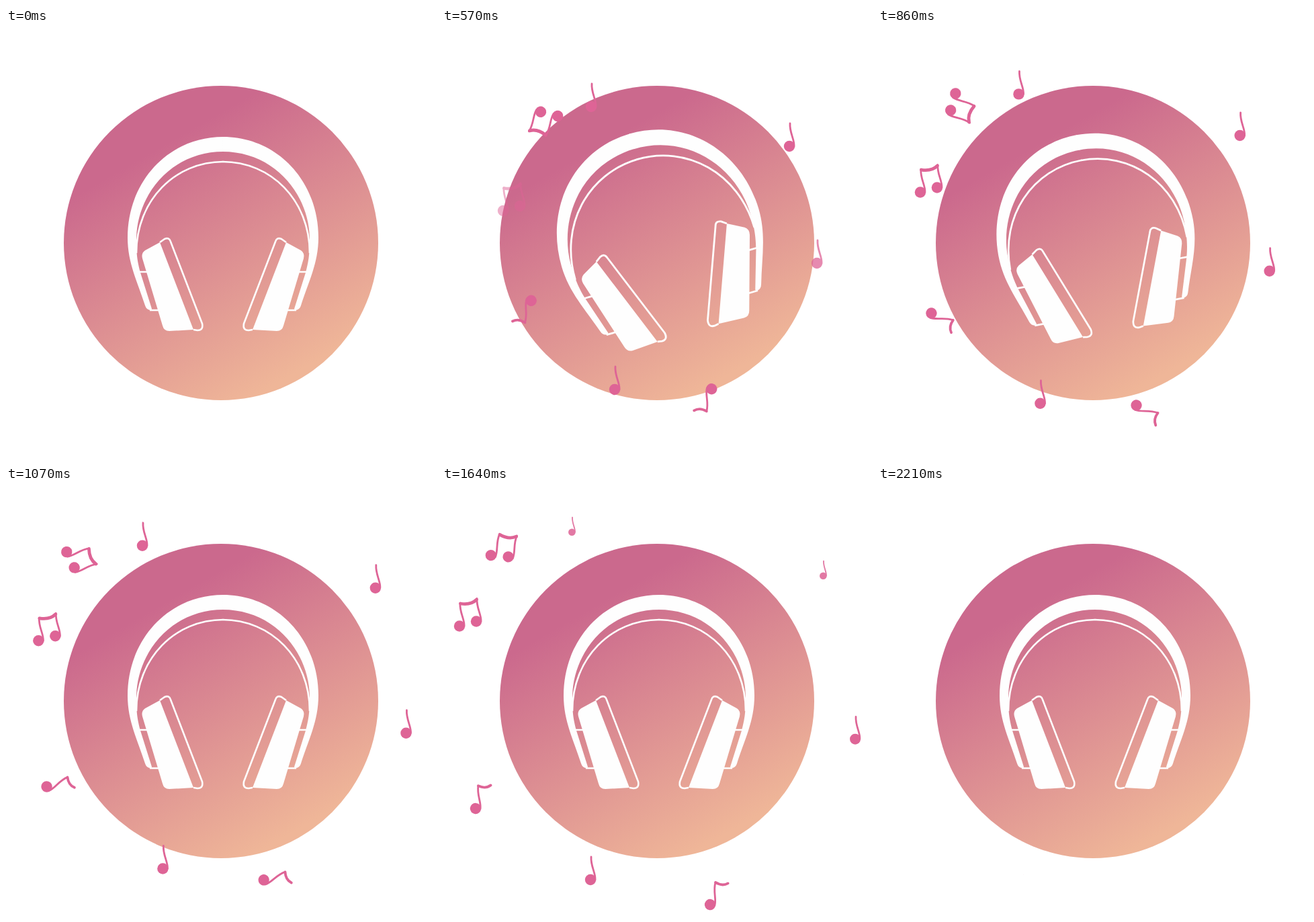
Animation, 640 px wide and 640 px high, one loop 2710 ms. Source, as an HTML page:

```html
<!DOCTYPE html>
<html lang="en">
<head>
<meta charset="utf-8">
<title>Headphones and notes</title>
<style>
html, body { margin: 0; width: 100%; height: 100%; overflow: hidden; background: #fff; }
svg { display: block; width: 100vw; height: 100vh; }
.line { fill: none; stroke: #fefefe; stroke-width: 2.6; stroke-linejoin: round; }
.stem { fill: none; stroke: #de6496; stroke-width: 2.8; stroke-linecap: round; }
.flag { stroke-width: 3.8; }
.beam { stroke-width: 4.8; }
</style>
</head>
<body>
<svg viewBox="0 0 640 640">
  <defs>
    <linearGradient id="sky" gradientUnits="userSpaceOnUse" x1="236" y1="174" x2="431" y2="513">
      <stop offset="0" stop-color="#cb698d"/>
      <stop offset="1" stop-color="#efb698"/>
    </linearGradient>
    <g id="half" fill="#fefefe">
      <path d="M323.5 162C242 162 181 228 181 312C181 350 196 378 207 413Q209 420 216 420L217 418L200 364C195 345 194 335 194 312C196 245 248 184 323.5 184Z"/>
      <path class="line" d="M323.5 199C252 199 194 256 194 335M197 363H210M214 420H228"/>
      <path d="M229 319L207 331Q201 335 203 343L233 443Q235 451 243 451L279 449Z"/>
      <path class="line" d="M229 319L236 314Q243 311 245 318L292 440Q294 450 285 450L279 449"/>
    </g>
    <g id="note">
      <circle r="8.2" fill="#de6496"/>
      <path class="stem" d="M1 -34C0 -20 8 -10 7 0"/>
    </g>
    <g id="single"><use href="#note" x="-1" y="15"/></g>
    <g id="flagged">
      <g transform="translate(-10 18)">
        <use href="#note"/>
        <path class="stem flag" d="M1 -34Q12 -30 19.5 -36.5"/>
      </g>
    </g>
    <g id="double">
      <use href="#note" x="-13" y="20"/>
      <use href="#note" x="12" y="13"/>
      <path class="stem beam" d="M-11.5 -13.5Q4 -11 12.5 -19.5"/>
    </g>
  </defs>
  <circle cx="320" cy="320" r="234" fill="url(#sky)"/>
  <g id="phones">
    <use href="#half"/>
    <use href="#half" transform="matrix(-1 0 0 1 646 0)"/>
  </g>
  <g id="notes"></g>
</svg>
<script>
const LOOP = 2710, HOLD = 360, FIRST = 4, LAST = 19;

// start/end: place at steps FIRST and LAST; turn: angles there;
// fade: first step and length of the fade-in; shrink: first and last step
const notes = [
  { shape: 'single', start: [223, 102], end: [194, 59], fade: [0, 3], shrink: [17, 22.7] },
  { shape: 'single', start: [518, 161], end: [568, 124], fade: [0, 3], shrink: [17, 22.7] },
  { shape: 'single', start: [559, 335], end: [616, 362], fade: [1, 4], shrink: [18.8, 27] },
  { shape: 'single', start: [258, 523], end: [222, 571], fade: [0, 3], shrink: [19.5, 27.2] },
  { shape: 'double', start: [104, 252], end: [39, 188.5], fade: [2, 4], shrink: [19, 25] },
  { shape: 'double', start: [151, 142], end: [92, 89], turn: [209.5, 20.6], fade: [0, 3], shrink: [22, 27] },
  { shape: 'flagged', start: [118.6, 420.8], end: [61.5, 463], turn: [194, 5], fade: [0, 3], shrink: [19, 26] },
  { shape: 'flagged', start: [388, 553], end: [412.5, 607.5], turn: [191, 12], fade: [0, 3], shrink: [19, 26] }
];

const phones = document.getElementById('phones');
const layer = document.getElementById('notes');
for (const note of notes) {
  note.el = document.createElementNS('http://www.w3.org/2000/svg', 'use');
  note.el.setAttribute('href', '#' + note.shape);
  layer.append(note.el);
}

const clamp = x => Math.max(0, Math.min(1, x));
const mix = (a, b, p) => a + (b - a) * p;

// Decaying motion: 0 at FIRST, 1 at LAST
function glide(n, rate) {
  const decay = x => Math.exp(-rate * x);
  return (decay(FIRST) - decay(n)) / (decay(FIRST) - decay(LAST));
}

// Eight steps per 570 ms, the seventh slightly longer
function stepAt(t) {
  if (t < HOLD) return 0;
  const u = t - HOLD, r = u % 570;
  const k = r < 500 ? Math.min(6, Math.floor(r / 70)) : 7;
  return Math.min(27, 8 * Math.floor(u / 570) + k + 1);
}

function draw(n) {
  const swing = n < 10 ? Math.sin(Math.PI * n / 10) : 0;
  const angle = -17.1 * swing ** 0.92, zoom = 1 + 0.082 * swing ** 1.5;
  phones.setAttribute('transform',
    `translate(323 306.3) rotate(${angle}) scale(${zoom}) translate(-323 -306.3)`);

  const move = glide(n, 0.105), spin = glide(n, 0.125);
  for (const { el, start, end, turn = [0, 0], fade, shrink } of notes) {
    const size = clamp((shrink[1] - n) / (shrink[1] - shrink[0]));
    const x = mix(start[0], end[0], move), y = mix(start[1], end[1], move);
    el.setAttribute('transform',
      `translate(${x} ${y}) rotate(${mix(...turn, spin)}) scale(${size})`);
    el.setAttribute('opacity', clamp((n - fade[0]) / fade[1]) * size ** 0.35);
  }
}

const began = performance.now();
function tick() {
  draw(stepAt((performance.now() - began) % LOOP));
  requestAnimationFrame(tick);
}
tick();
</script>
</body>
</html>
```
